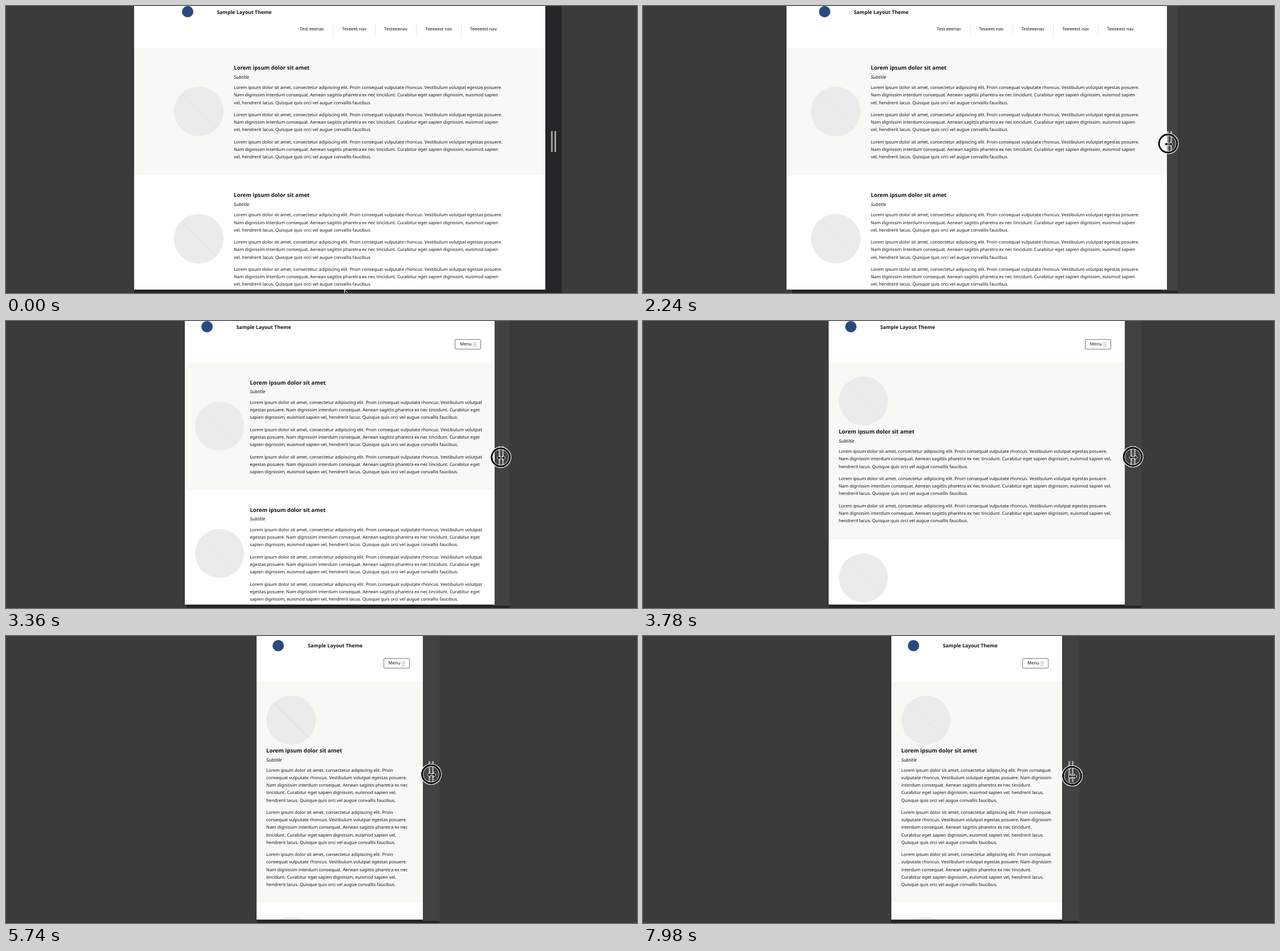
An HTML page for the animation above (8000 ms loop, 1108 by 505 pixels).

```html
<!DOCTYPE html>
<html lang="en">
<head>
<meta charset="utf-8">
<title>Resizing a responsive page</title>
<style>
html, body { margin: 0; width: 100%; height: 100%; overflow: hidden; background: #3b3b3b; }
body { position: relative; font: 7.74px/13.1px "Noto Sans", "Open Sans", sans-serif; color: #141414; text-rendering: geometricPrecision; }
body > * { position: absolute; top: 0; }
#frame { height: 505px; background: #262628; }
#strip { width: 29px; height: 501px; background: #424242; }
#page { height: 499px; overflow: hidden; background: #fff; }
#grip { top: 220px; box-sizing: border-box; width: 9px; height: 37px; border: solid #a0a09b; border-width: 0 3px; }
#cursor { left: 0; width: 1108px; height: 505px; }

header { position: relative; height: 73px; margin-top: var(--shift); }
header > * { position: absolute; white-space: nowrap; }
.logo { left: calc(var(--pad) + 11px); top: 0; width: 20px; height: 20px; border-radius: 50%; background: #2a4a7d; }
.name { left: calc(var(--pad) + 73px); top: 4.7px; font-weight: bold; font-size: 8.72px; }
nav { display: flex; right: var(--pad); top: 32px; }
nav span { padding: 0 15.2px; line-height: 19px; border-left: 1px solid #e3e3e3; }
nav span:first-child { border: 0; }
.menu { right: calc(var(--pad) + 6px); top: 32px; width: 46px; height: 18px; box-sizing: border-box; border: 1px solid #777; border-radius: 2px; padding-left: 7.5px; line-height: 16px; }
.menu i { position: absolute; right: 7px; top: 5px; width: 6px; height: 2px; border: solid #aaa; border-width: 1px 0; box-shadow: 0 2px #fff, 0 3px #aaa; }

section { display: flex; align-items: center; padding: 24.9px calc(var(--pad) + .7px) 24.9px var(--pad); }
section:nth-of-type(odd) { background: #f8f8f4; }
.pic { flex: none; width: 86.6px; height: 86.6px; border-radius: 50%; margin-right: 10.1px;
  background: linear-gradient(45deg, #ebebeb 49.6%, #e0e0e0 49.7% 50.3%, #ebebeb 50.4%); }
.text { position: relative; top: .7px; }
h2 { margin: 0; font-size: 9.67px; line-height: 19.6px; white-space: nowrap; }
em { display: block; font-size: 8.1px; line-height: 13px; margin-bottom: 6.6px; }
p { margin: 0 0 8.65px; }
p:last-child { margin: 0; }

.wide header { height: 73.6px; }
.wide .logo { left: calc(var(--pad) + 14px); }
.wide .name { left: calc(var(--pad) + 75.3px); }
.wide .pic { margin-right: 18.4px; }
.wide .menu, :not(.wide) > header nav { display: none; }
.stack section { display: block; }
</style>
</head>
<body>
<div id="frame"></div>
<div id="strip"></div>
<div id="page">
  <header>
    <div class="logo"></div>
    <div class="name">Sample Layout Theme</div>
    <nav><span>Test eeenav</span><span>Teseeet nav</span><span>Testeeenav</span><span>Teeeeest nav</span><span>Teeeeest nav</span></nav>
    <div class="menu">Menu<i></i></div>
  </header>
</div>
<div id="grip"></div>
<svg id="cursor">
  <g id="ring" fill="none">
    <circle r="16" stroke="#000" stroke-width="3.4"/>
    <circle r="18" stroke="#fff" stroke-width="1.2"/>
    <circle r="14" stroke="#fff" stroke-width=".9"/>
  </g>
  <path id="glyph" stroke="#fff" stroke-linejoin="round"/>
</svg>
<script>
const LOOP = 8000, STEP = 70, LAG = 98, MID = 586;
const $ = id => document.getElementById(id);

const para = '<p>Lorem ipsum dolor sit amet, consectetur adipiscing elit. Proin consequat vulputate rhoncus. ' +
  'Vestibulum volutpat egestas posuere. Nam dignissim interdum consequat. Aenean sagittis pharetra ex nec tincidunt. ' +
  'Curabitur eget sapien dignissim, euismod sapien vel, hendrerit lacus. Quisque quis orci vel augue convallis faucibus.</p>';
const block = '<section><div class="pic"></div><div class="text"><h2>Lorem ipsum dolor sit amet</h2><em>Subtitle</em>' +
  para.repeat(3) + '</div></section>';
$('page').insertAdjacentHTML('beforeend', block.repeat(2));

// turning points of the drag: [time, half width of the viewport]
const DRAG = [[1890, 361], [2240, 324], [2660, 289], [2800, 286.5], [3640, 260], [4760, 256],
  [5640, 146.5], [5740, 146], [6510, 104], [7000, 104], [7840, 149.5], [7980, 151]];

const ARROW = 'M0 0V15l3.5-3 2.3 5 2-.9-2.2-5h4.6z';
const POINT = 'M-1.5 1.2a1.5 1.5 0 0 1 3 0V6l5 1.2q1.5.4 1.3 2L7 13 5.5 16.5H-1L-5 10.5q.5-1.8 2-.8l1.5 1.5z';
const RESIZE = 'M-7.5 0l4.5-4v2.7h6v-2.7l4.5 4-4.5 4v-2.7h-6v2.7z';

const clamp = (v, lo = 0, hi = 1) => Math.min(hi, Math.max(lo, v));

function halfWidth(t) {
  t = clamp(t, DRAG[0][0], DRAG[DRAG.length - 1][0]);
  const i = Math.max(1, DRAG.findIndex(([time]) => time >= t));
  const [t0, w0] = DRAG[i - 1], [t1, w1] = DRAG[i];
  return w0 + (w1 - w0) * (t - t0) / (t1 - t0);
}

// pointer relative to the middle of the grip: swings in past it, settles, then drifts during the drag
function pointer(t) {
  if (t < 910) {
    const u = Math.min(1, t / 840) - 1;
    return [367 * (2.5 * u ** 3 + 1.5 * u * u), 235 + 264 * u * u];
  }
  if (t < 1890) return [-4 + 3.5 * clamp((t - 1400) / 420), 235 + 3 * clamp((t - 1190) / 630)];
  const pull = clamp((t - 1890) / 350) * clamp((3780 - t) / 1540);
  return [2 * clamp((t - 5740) / 2000) - 2.5 * pull, 239 + 3 * pull + 7 * clamp((t - 3780) / 3220)];
}

function place(el, left, width) {
  el.style.left = left + 'px';
  if (width) el.style.width = width + 'px';
}

function draw(now) {
  const t = Math.floor(now % LOOP / STEP) * STEP;
  const size = halfWidth(t), right = MID + size;
  const half = halfWidth(t - LAG); // the page trails the viewport

  place($('frame'), MID - size, size * 2 + 29);
  place($('strip'), right);
  place($('grip'), right + 10);
  $('strip').style.opacity = clamp((t - 1470) / 210);

  const page = $('page');
  place(page, MID - half, half * 2);
  page.className = half > 290 ? 'wide' : half < 266 ? 'stack' : '';
  page.style.setProperty('--pad', Math.max(17.5, half - 291) + 'px');
  page.style.setProperty('--shift', (half < 189 ? 6.8 : 0) + 'px');

  const [dx, y] = pointer(t), x = right + 14.5 + dx;
  const drag = t >= 1540 ? 1 : 0;
  $('glyph').setAttribute('d', drag ? RESIZE : t >= 910 ? POINT : ARROW);
  $('glyph').setAttribute('transform', `translate(${x + drag} ${y + drag})`);
  $('ring').setAttribute('transform', `translate(${x} ${y}) scale(${drag ? 1 : 1.15})`);
  $('ring').style.display = t >= 1400 ? '' : 'none';
}

function tick() {
  draw(performance.now());
  requestAnimationFrame(tick);
}
tick();
</script>
</body>
</html>
```
